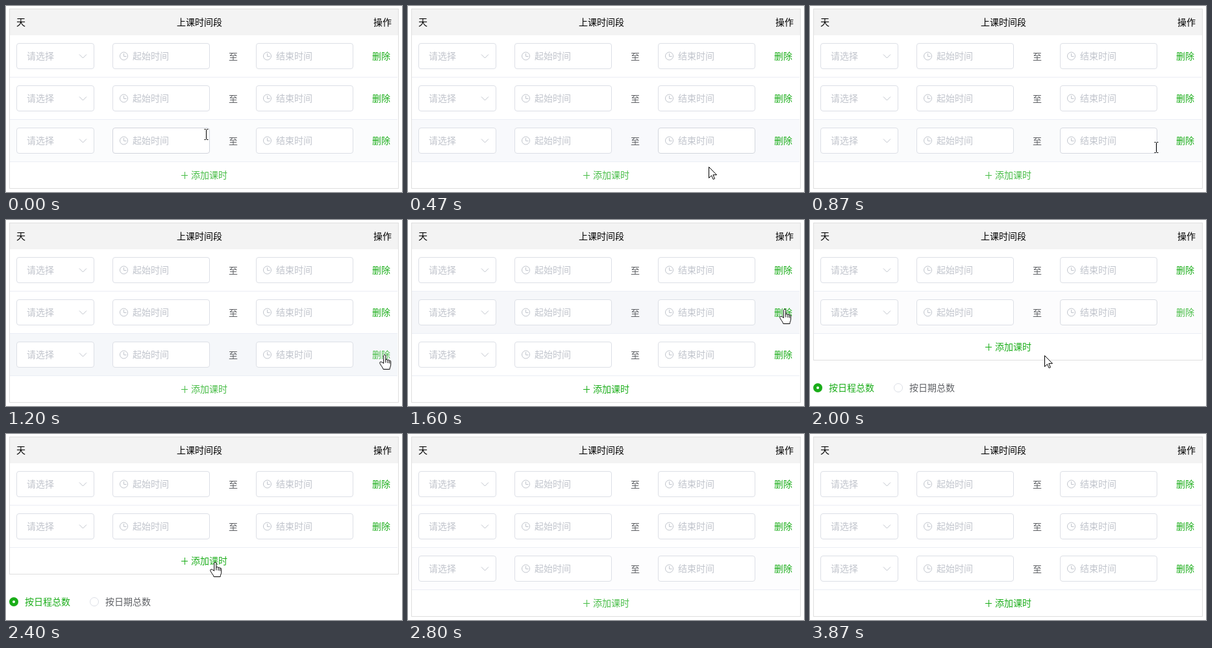
An HTML page that plays this animation: 610x286 px, repeating every 3.94 s.

```html
<!DOCTYPE html>
<html lang="zh-CN">
<head>
<meta charset="utf-8">
<title>上课时间段</title>
<style>
html, body { margin: 0; width: 100%; height: 100%; overflow: hidden; background: #fff; }
svg { display: block; width: 610px; height: 286px; }
text { font: 14px "Noto Sans CJK SC", "Noto Sans CJK", sans-serif; }
</style>
</head>
<body>
<svg id="stage" viewBox="0 0 610 286"></svg>
<script>
const LOOP = 3940, STEP = 200 / 3, ROW = 65;
const GREEN = [26, 173, 25], LIGHT = [72, 189, 71];
const BORDER = [220, 223, 230], BORDER_ON = [192, 196, 204];
const WHITE = [255, 255, 255], ROW_ON = [245, 247, 250];
const GREY = '#c0c4cc', TEXT = '#606266';
const stage = document.getElementById('stage');
const rowMid = i => 77 + i * ROW;

function el(name, attrs, parent = stage) {
  const node = document.createElementNS('http://www.w3.org/2000/svg', name);
  for (const key in attrs) node.setAttribute(key, attrs[key]);
  parent.appendChild(node);
  return node;
}
const group = (parent = stage) => el('g', {}, parent);
const rect = (x, y, width, height, fill, parent) => el('rect', { x, y, width, height, fill }, parent);
const line = (d, stroke, parent) => el('path', { d, stroke, fill: 'none' }, parent);
const show = (node, on) => { node.style.display = on ? '' : 'none'; };

function label(str, x, mid, fill, parent) {
  const node = el('text', { x, y: mid + 5, fill }, parent);
  node.textContent = str;
  return node;
}
function field(x, width, mid, parent) {
  return el('rect', { x: x + .5, y: mid - 19.5, width: width - 1, height: 39, rx: 3.5, fill: '#fff', stroke: '#dcdfe6' }, parent);
}
function timeField(x, mid, hint, parent) {
  const box = field(x, 150, mid, parent);
  el('circle', { cx: x + 17.5, cy: mid, r: 6, fill: 'none', stroke: GREY }, parent);
  line(`M${x + 17.5} ${mid - 4}V${mid + .5}H${x + 21.5}`, GREY, parent);
  label(hint, x + 31, mid, GREY, parent);
  return box;
}
function makeRow(i) {
  const mid = rowMid(i), g = group();
  const bg = rect(6, mid - 32, 597, 64, '#fff', g);
  rect(6, mid + 32, 597, 1, '#ebeef5', g);
  field(16, 120, mid, g);
  label('请选择', 32, mid, GREY, g);
  line(`M113 ${mid - 2.5}l5.5 5.5l5.5 -5.5`, GREY, g);
  const start = timeField(164, mid, '起始时间', g);
  label('至', 343, mid + 1, TEXT, g);
  const end = timeField(385, mid, '结束时间', g);
  const del = label('删除', 564, mid, '#1aad19', g);
  return { g, bg, start, end, del };
}

rect(6, 5, 598, 40, '#f3f3f3');
label('天', 16, 25, '#000');
label('上课时间段', 263, 25, '#000');
label('操作', 566, 25, '#000');
const rows = [0, 1, 2].map(makeRow);
const frame = el('rect', { x: 5.5, y: 4.5, width: 599, height: 276, fill: 'none', stroke: '#dfdfdf' });

const add = group();
const plus = line('M270 260.5H280M275.5 255V266', '#1aad19', add);
const addText = label('添加课时', 285, 260, '#1aad19', add);

const radios = group();
el('circle', { cx: 12, cy: 258, r: 7, fill: '#1aad19' }, radios);
el('circle', { cx: 12, cy: 258, r: 2, fill: '#fff' }, radios);
label('按日程总数', 29, 258, '#1aad19', radios);
el('circle', { cx: 136, cy: 258, r: 6.5, fill: '#fff', stroke: '#dcdfe6' }, radios);
label('按日期总数', 153, 258, TEXT, radios);

// Pointers, each drawn around its hot spot
const pointer = group();
const shapes = {
  arrow: 'M0 0V17L4 13.2L6.6 19L9 18L6.4 12.2H12Z',
  hand: 'M-1.8 13V1.2C-1.8 -.8 1.4 -.8 1.4 1.2V8C1.4 6.4 4.4 6.4 4.6 8.4C5 7 7.2 7.2 7.2 9.2' +
    'C7.8 8 9.2 8.4 9.2 10.2V15C9.2 18 7.6 19 7.6 22H-2.4C-2.4 19.6 -7.8 14.4 -7.8 12C-7.6 10 -5 10 -1.8 13Z' +
    'M1.4 8V12M4.6 8.4V12.5M7.2 9.2V13',
  beam: 'M-3 -8H-1L0 -7L1 -8H3M0 -7V7M-3 8H-1L0 7L1 8H3'
};
const pointers = Object.entries(shapes).map(([kind, d]) =>
  ({ kind, node: el('path', { d, fill: kind === 'beam' ? 'none' : '#fff', stroke: '#000' }, pointer) }));

// Pointer stops: ms, x, y
const stops = [
  [100, 308, 197], [370, 568, 236], [600, 326, 261], [870, 533, 217], [1130, 583, 207], [1270, 583, 207],
  [1470, 580, 137], [1670, 580, 137], [2000, 361, 208], [2270, 323, 204], [2400, 322, 197], [2530, 322, 197],
  [2730, 316, 300]
];
const ENTER = -100, LEAVE = 2720;
const PRESS_DEL = 1450, REMOVED = 1660, PRESS_ADD = 2260, ADDED = 2460, BLUR = 3700;

const between = (t, a, b) => t >= a && t < b;
const rowCount = t => between(t, REMOVED, ADDED) ? 2 : 3;

function pointerAt(t) {
  const n = stops.findIndex(s => s[0] > t);
  if (n <= 0) return (n ? stops[stops.length - 1] : stops[0]).slice(1);
  const [t0, x0, y0] = stops[n - 1], [t1, x1, y1] = stops[n];
  const f = (t - t0) / (t1 - t0);
  return [x0 + (x1 - x0) * f, y0 + (y1 - y0) * f];
}
function over(t, left, right, mid, half) {
  const [x, y] = pointerAt(t);
  return between(t, ENTER, LEAVE) && x >= left && x <= right && Math.abs(y - mid) <= half;
}
const overRow = (t, i) => i < rowCount(t) && over(t, 6, 604, rowMid(i), 32);
const overStart = (t, i) => overRow(t, i) && over(t, 164, 314, rowMid(i), 20);
const overEnd = (t, i) => overRow(t, i) && over(t, 385, 535, rowMid(i), 20);
const overDel = (t, i) => overRow(t, i) && over(t, 564, 592, rowMid(i), 10);
const overAdd = t => over(t, 270, 341, 65 + rowCount(t) * ROW, 13);

// Buttons are light while hovered or focused, dark while pressed
const pressed = t => between(t, PRESS_DEL, REMOVED) || between(t, PRESS_ADD, ADDED);
const delLit = (t, i) => !pressed(t) && (overDel(t, i) || i === 1 && between(t, REMOVED, PRESS_ADD));
const addLit = t => !pressed(t) && (overAdd(t) || t < PRESS_DEL || between(t, ADDED, BLUR));

// A transition is the share of the last `span` ms in which the state held
function fade(from, to, t, span, test) {
  const n = 20;
  let sum = 0;
  for (let k = 0; k < n; k++) sum += test(t - (k + .5) * span / n);
  return `rgb(${from.map((v, i) => Math.round(v + (to[i] - v) * sum / n))})`;
}
function pointerKind(t) {
  const any = test => rows.some((row, i) => test(t, i));
  if (overAdd(t) || any(overDel)) return 'hand';
  return any(overStart) || any(overEnd) ? 'beam' : 'arrow';
}

function render(ms) {
  const t = Math.round(Math.floor((ms % LOOP + 5) / STEP) * STEP / 10) * 10;
  const count = rowCount(t), lift = (count - 3) * ROW;

  rows.forEach((row, i) => {
    show(row.g, i < count);
    row.bg.setAttribute('fill', fade(WHITE, ROW_ON, t, 250, s => overRow(s, i)));
    row.start.setAttribute('stroke', fade(BORDER, BORDER_ON, t, 250, s => overStart(s, i)));
    row.end.setAttribute('stroke', fade(BORDER, BORDER_ON, t, 250, s => overEnd(s, i)));
    row.del.setAttribute('fill', fade(GREEN, LIGHT, t, 150, s => delLit(s, i)));
  });

  const tint = fade(GREEN, LIGHT, t, 150, addLit);
  plus.setAttribute('stroke', tint);
  addText.setAttribute('fill', tint);
  add.setAttribute('transform', `translate(0 ${lift})`);
  frame.setAttribute('height', 276 + lift);
  show(radios, count < 3);

  const [x, y] = pointerAt(t).map(Math.round), kind = pointerKind(t);
  pointers.forEach(p => show(p.node, p.kind === kind));
  pointer.setAttribute('transform', `translate(${x + .5} ${y + .5})`);
  show(pointer, t < LEAVE);
}

const began = performance.now();
function tick() {
  render(performance.now() - began);
  requestAnimationFrame(tick);
}
tick();
</script>
</body>
</html>
```
